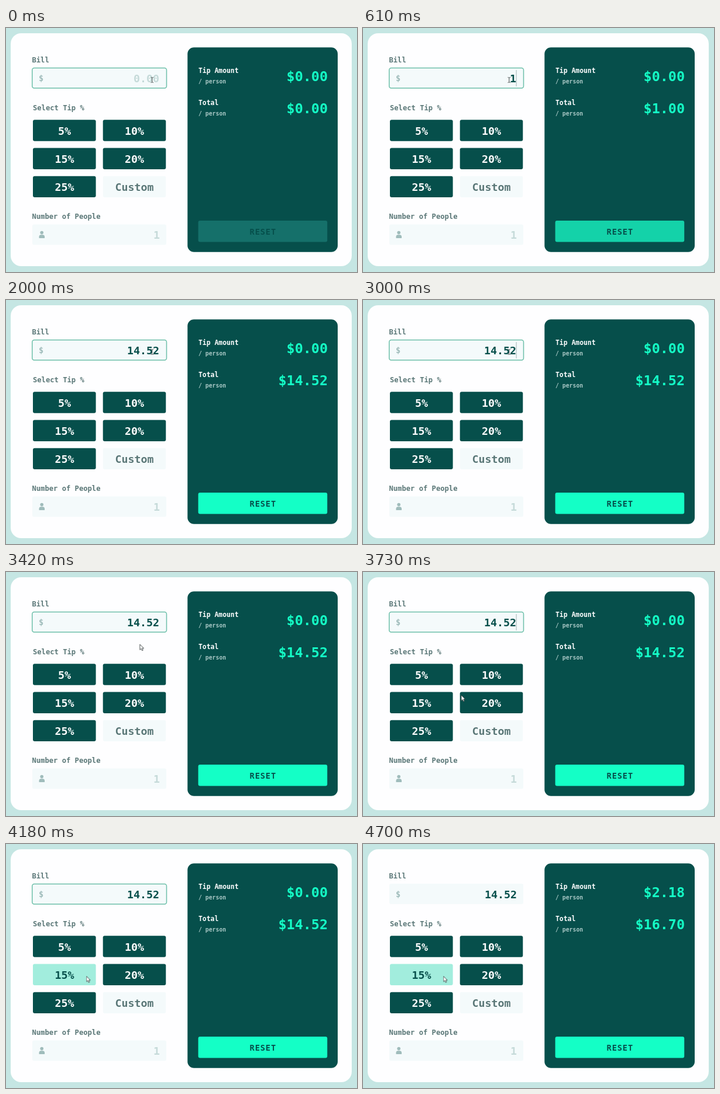
These frames come from a looping animation (600 by 418 pixels, 5000 ms). An HTML page:

```html
<!DOCTYPE html>
<html lang="en">
<head>
<meta charset="utf-8">
<title>Tip calculator</title>
<style>
  html, body { margin: 0; width: 100%; height: 100%; overflow: hidden; background: #c5e6e3; }
  svg { display: block; width: 100%; height: 100%; }
  text { font-family: "DejaVu Sans Mono", "Liberation Mono", monospace; font-weight: 700; white-space: pre; }
</style>
</head>
<body>
<svg id="stage" viewBox="0 0 600 418"></svg>
<script>
const LOOP = 5000;
const DARK = '#064f4b', MINT = '#14ffc6', PALE = '#f4fafb', HOVER = '#a2eddd';
const LABEL = '#5a7777', ICON = '#9fbcbb', HINT = '#c5dad9', WHITE = '#fefeff';
const stage = document.getElementById('stage');

function add(tag, attrs) {
  const el = document.createElementNS('http://www.w3.org/2000/svg', tag);
  for (const key in attrs) el.setAttribute(key, attrs[key]);
  return stage.appendChild(el);
}
const box = (x, y, width, height, rx, fill, more) => add('rect', { x, y, width, height, rx, fill, ...more });

function label(str, x, y, size, fill, anchor = 'start', more) {
  const el = add('text', { x, y, fill, 'font-size': size, 'text-anchor': anchor, ...more });
  el.textContent = str;
  return el;
}

// steps: [time in ms, properties, easing until the next step]
function loop(el, steps, easing = 'linear') {
  const last = steps[steps.length - 1];
  const frames = [...steps, [LOOP, last[1]]].map(([ms, props, ease]) =>
    ({ offset: ms / LOOP, easing: ease || easing, ...props }));
  el.animate(frames, { duration: LOOP, iterations: Infinity });
}

// toggles: times at which visibility flips, starting hidden
function blink(el, ...toggles) {
  const steps = [[0, { opacity: 0 }]];
  toggles.forEach((ms, i) => steps.push([ms, { opacity: i % 2 ? 0 : 1 }]));
  loop(el, steps, 'step-end');
}

// states: [start in ms, text]; each shows until the next one starts
function sequence(states, x, y, size, fill) {
  states.forEach(([start, str], i) => {
    const el = label(str, x, y, size, fill, 'end');
    const end = i + 1 < states.length ? states[i + 1][0] : LOOP;
    const steps = [[0, { opacity: start ? 0 : 1 }]];
    if (start) steps.push([start, { opacity: 1 }]);
    if (end < LOOP) steps.push([end, { opacity: 0 }]);
    loop(el, steps, 'step-end');
  });
}

function fade(el, from, to, start, length = 300) {
  loop(el, [[0, { fill: from }], [start, { fill: from }, 'ease'], [start + length, { fill: to }]]);
}

const TYPED = [490, 850, 1300, 1690, 1860];
const BLUR = 4440, CLICK = 4500;

box(8, 9, 583, 399, 18, WHITE);

// Bill
label('Bill', 44.5, 58.5, 12.15, LABEL);
box(45, 68, 229, 35, 3, PALE);
const focus = box(44.75, 68.5, 229.75, 34.5, 3.5, 'none', { stroke: '#6cbfa9', 'stroke-width': 1.5 });
loop(focus, [[0, { opacity: 1 }], [BLUR, { opacity: 0 }]], 'step-end');
label('$', 56, 91, 13.5, ICON);

const hint = label('0.00', 262, 93, 18.3, HINT, 'end');
loop(hint, [[0, { opacity: 1 }], [TYPED[0], { opacity: 0 }]], 'step-end');
const bill = '14.52';
const billStates = TYPED.map((ms, i) => [ms, bill.slice(0, i + 1)]);
sequence(billStates, 262, 93, 18.3, DARK);
const billTexts = stage.querySelectorAll('text');
loop(billTexts[billTexts.length - 1],
  [[0, { transform: 'translateX(0px)' }], [BLUR, { transform: 'translateX(1px)' }]], 'step-end');
const caret = box(261.6, 72, 1, 28, 0, '#a3b5b5');
blink(caret, TYPED[0], 1985, 2520, 3030, 3530, 4040);

// Tip choices
label('Select Tip %', 46, 141, 12.15, LABEL);
const buttons = {};
['5%', '10%', '15%', '20%', '25%', 'Custom'].forEach((name, i) => {
  const right = i % 2, row = i >> 1, y = 157.3 + row * 48.2;
  const custom = name === 'Custom';
  buttons[name] = [
    box(right ? 165.7 : 46, y, 107.6, 36.4, 3, custom ? PALE : DARK),
    label(name, right ? 219.5 : 100, y + 25.7, 18.3, custom ? LABEL : WHITE, 'middle')
  ];
});
fade(buttons['15%'][0], DARK, HOVER, 3900);
fade(buttons['15%'][1], WHITE, DARK, 3900);
loop(buttons['10%'][0], [
  [0, { fill: DARK }], [3500, { fill: DARK }], [3590, { fill: '#478f85' }], [3720, { fill: DARK }]
]);

// People
label('Number of People', 44.5, 326.5, 12.15, LABEL);
box(45, 336.5, 229, 35, 3, PALE);
add('circle', { cx: 61.2, cy: 350.6, r: 2.8, fill: ICON });
add('path', { d: 'M56.5 360v-2.2q0-3.6 3.2-3.6h3q3.4 0 3.4 3.6V360z', fill: ICON });
label('1', 263, 361, 18.3, HINT, 'end');

// Results
box(310.3, 33.3, 256.7, 350.4, 11, DARK);
[['Tip Amount', 77], ['Total', 132]].forEach(([name, y]) => {
  label(name, 329, y, 11.4, WHITE);
  label('/ person', 329, y + 18, 9.8, '#a9c8c6');
});
sequence([[0, '$0.00'], [CLICK, '$2.18']], 550, 91, 23.4, MINT);
sequence([[0, '$0.00'], [TYPED[0], '$1.00'], [TYPED[1], '$14.00'], [TYPED[3], '$14.50'],
  [TYPED[4], '$14.52'], [CLICK, '$16.70']], 550, 145.5, 23.4, MINT);

fade(box(328.6, 330, 220.6, 36.4, 3, '#15706a'), '#15706a', MINT, TYPED[0]);
label('RESET', 439.3, 353.5, 13.6, DARK, 'middle', { 'letter-spacing': 0.9 });

// Pointers
const beam = add('path', {
  d: 'M247.6 84.5q2 0 2.2 1.2q.2-1.2 2.2-1.2M249.8 85.5v7M247.6 93.5q2 0 2.2-1.2q.2 1.2 2.2 1.2',
  fill: 'none', stroke: '#444c4c', 'stroke-width': 1
});
loop(beam, [[0, { transform: 'translate(0px,0px)', opacity: 1 }],
  [3100, { transform: 'translate(0px,0px)', opacity: 1 }],
  [3290, { transform: 'translate(-5px,12px)', opacity: 1 }, 'step-end'],
  [3300, { transform: 'translate(-5px,12px)', opacity: 0 }]]);

const arrow = add('path', {
  d: 'M0 0V9.4L2.2 7.4L3.8 10.8L5.4 10L3.9 6.8H6.8Z',
  fill: '#fff', stroke: '#384040', 'stroke-width': 0.9, 'stroke-linejoin': 'round'
});
blink(arrow, 3300);
const at = (x, y) => ({ transform: `translate(${x}px,${y}px)` });
loop(arrow, [[0, at(244, 100)], [3300, at(244, 100)], [3420, at(229, 123.5)], [3520, at(207, 163)],
  [3620, at(184, 196)], [3730, at(168, 211)], [3880, at(150, 222), 'ease-out'], [4060, at(137.5, 226.5)]]);
</script>
</body>
</html>
```
